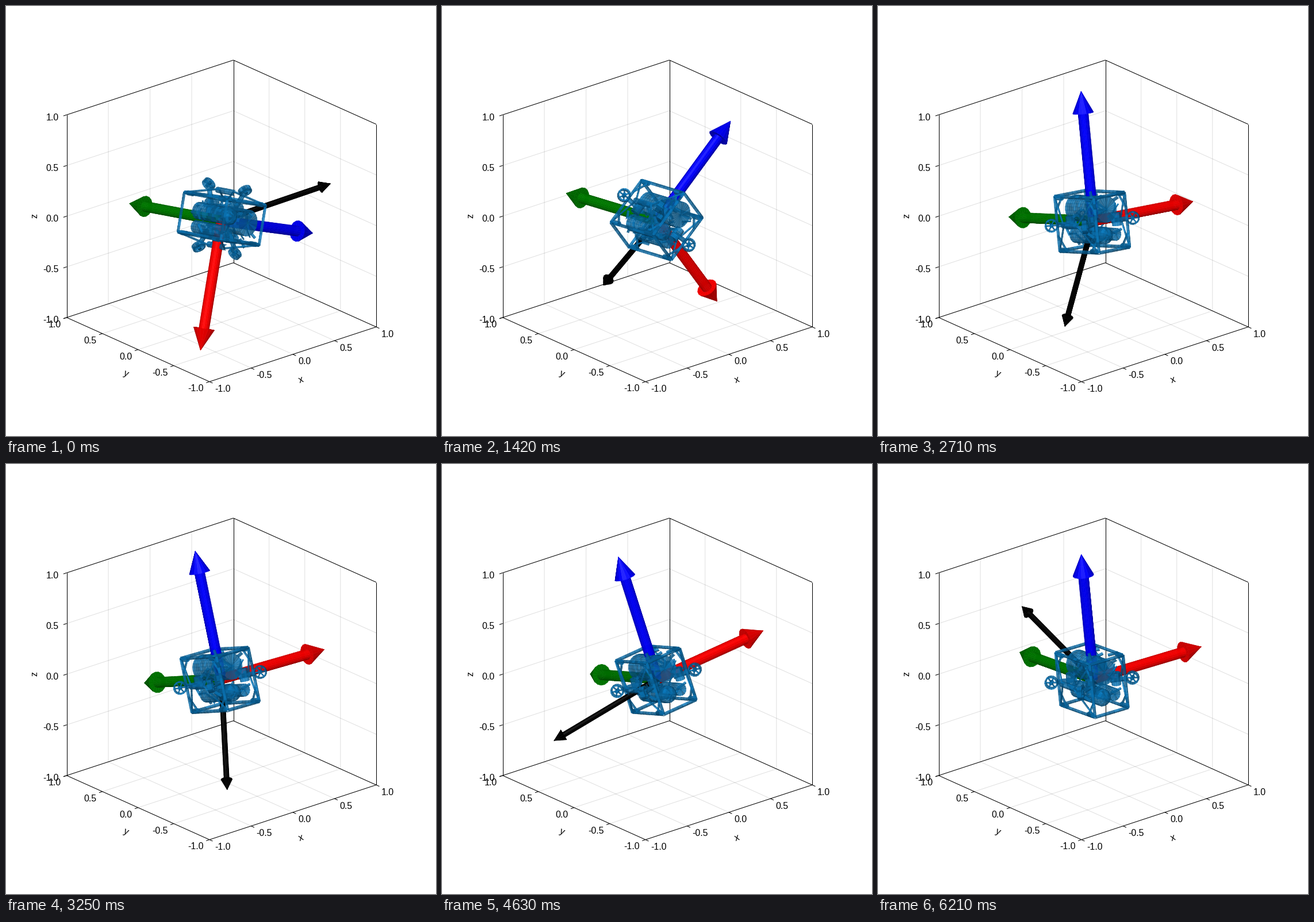
Write a matplotlib script that moves like this. It is 748 px wide and 748 px high and loops after 6250 ms.

```python
import itertools

import numpy as np
import matplotlib.pyplot as plt
from matplotlib.animation import FuncAnimation
from matplotlib.collections import LineCollection, PolyCollection

SIZE, FRAMES, LOOP = 748, 150, 6250
CENTER = np.array([374.75, 373.8])
AXES = np.array([[145, -47.6], [-124.2, -55.8], [0, -176.3]])  # px per data unit
LIGHT = np.array([-0.1, 0.3, 0.95])
LIGHT /= np.linalg.norm(LIGHT)
UP = np.array([0, 1, 0])
rng = np.random.default_rng(4)

# seconds; green azimuth, elevation, roll about green; black azimuth, elevation
KEYS = np.array([
    [0.000, -135, 7.6, -95.4, -18, 18],
    [0.625, -135, 13.0, -80.6, -268, -9],
    [2.167, -134, 7.1, -0.8, -660, -48],
    [3.250, -126, -1.8, 13.0, -997, -67],
    [4.083, -122, 4.3, 21.1, -1102, -46],
    [5.208, -121, 0.2, 19.6, -1483, -11],
    [6.208, -125, 11.7, 14.5, -1938, 37],
])
TIMES, ANGLES = KEYS[:, 0], np.radians(KEYS[:, 1:])
SLOPES = np.gradient(ANGLES, TIMES, axis=0)


def unit(v):
    return v / np.linalg.norm(v)


def angles_at(t):
    """Cubic Hermite through the key angles."""
    i = np.clip(np.searchsorted(TIMES, t, side="right") - 1, 0, len(TIMES) - 2)
    h = TIMES[i + 1] - TIMES[i]
    s = min((t - TIMES[i]) / h, 1)
    a = (1 + 2 * s) * (1 - s)**2
    return (a * ANGLES[i] + (1 - a) * ANGLES[i + 1]
            + h * s * (1 - s) * ((1 - s) * SLOPES[i] - s * SLOPES[i + 1]))


def direction(az, el):
    """Vector as (right, up, towards viewer)."""
    return np.array([np.cos(el) * np.cos(az), np.sin(el), np.cos(el) * np.sin(az)])


def attitude(az, el, roll):
    """Columns are the red, green and blue body axes."""
    green = direction(az, el)
    top = unit(UP - green * green[1])
    side = np.cross(green, top)
    red = np.sin(roll) * top + np.cos(roll) * side
    return np.column_stack([red, green, np.cross(red, green)])


def lathe(base, axis, prof, n=12):
    """Quads of a (distance, radius) profile turned about an axis."""
    w = unit(np.array(axis, float))
    u = unit(np.cross(w, np.eye(3)[np.argmin(abs(w))]))
    v = np.cross(w, u)
    th = np.linspace(0, 2 * np.pi, n + 1)
    ring = np.outer(np.cos(th), u) + np.outer(np.sin(th), v)
    d, r = np.array(prof, float).T[:, :, None, None]
    p = np.array(base, float) + d * w + r * ring
    quads = np.stack([p[:-1, :-1], p[:-1, 1:], p[1:, 1:], p[1:, :-1]], axis=2)
    return quads.reshape(-1, 4, 3)


def bar(p, q, r=2.8, n=4):
    p, q = np.array(p, float), np.array(q, float)
    length = np.linalg.norm(q - p)
    steps = np.linspace(0, length, max(2, int(length / 9) + 1))
    return lathe(p, q - p, [(s, r) for s in steps], n)


def can(base, axis, length, r, n=18, dome=0):
    prof = [(0, 0)]
    if dome:
        prof += [(dome * (1 - np.cos(a)), r * np.sin(a)) for a in (0.4, 0.8, 1.2)]
    prof += [(s, r) for s in np.linspace(dome, length, int(length / 5))]
    return lathe(base, axis, prof + [(length, 0)], n)


def arrow(axis, r, head_r, head, n=16, shaft=190, segs=20):
    prof = [(s, r) for s in np.linspace(0, shaft, segs + 1)]
    prof += [(shaft, head_r), (shaft + head / 2, head_r / 2), (shaft + head, 0)]
    bias = np.zeros((segs + 3) * n)
    bias[segs * n:(segs + 1) * n] = -12  # flat back of the head stays under the shaft
    return lathe((0, 0, 0), axis, prof, n), bias


def thruster(hub, axis):
    rim = [(-4, 9.5), (-4, 11.5), (4, 11.5), (4, 9.5), (-4, 9.5)]
    across = np.cross(axis, (0, 0, 1))
    parts = [lathe(hub, axis, rim, 16), can(hub - 6 * axis, axis, 12, 3, 8)]
    for a in np.arange(3) * np.pi / 3:
        spoke = 10 * (np.cos(a) * across + np.array([0, 0, np.sin(a)]))
        parts.append(bar(hub - spoke, hub + spoke, 1.2))
    return parts


def vehicle():
    mid, half = np.array([-4, -1, -1]), np.array([35, 53, 48])
    parts = []
    corners = [mid + half * s for s in itertools.product((-1, 1), repeat=3)]
    for p, q in itertools.combinations(corners, 2):
        if np.count_nonzero(p != q) == 1:
            parts.append(bar(p, q))
    for p in corners:
        x, y, z = np.sign(mid - p)
        parts.append(bar(p + (0, 0, 26 * z), p + (0, 20 * y, 0), 2))
        parts.append(can(p + (0, 6 * y, 2 * z), (0, y, 0), 14, 4, 8))
        parts.append(bar(p, mid + (-50 * x, -18 * y, 0), 1.6))

    parts.append(can((-4, -43, 22), (0, 1, 0), 84, 23, 24))
    parts.append(can((-11, -51, -23), (0, 1, 0), 88, 15, 18, dome=10))
    parts.append(can((17, -38, -25), (0, 1, 0), 74, 11, 14))

    for sx in (-1, 1):
        parts.append(bar(mid + (sx * 48, -22, 0), mid + (sx * 48, 22, 0), 5, 8))
        for sy in (-1, 1):
            hub = mid + (sx * 55, sy * 45, 0)
            parts += thruster(hub, unit(np.array([1, -sx * sy, 0.0])))
            parts.append(bar(hub + (-sx * 9, -sy * 4, 0), (sx * 18, sy * 26, -2), 4, 8))
            parts.append(can((sx * 27, sy * 30, -11), (0, 0, 1), 22, 8, 12))

    for _ in range(40):  # cables and brackets
        p = mid + half * rng.uniform(-.9, .9, 3)
        parts.append(bar(p, p + rng.uniform(-16, 16, 3), rng.uniform(1.2, 3)))
    return np.concatenate(parts)


def layer(mesh, bias, tint, alpha, gloss):
    """Mesh with one row of depth bias, alpha, gloss and colour per face."""
    look = np.empty((len(mesh), 6))
    look[:, 0], look[:, 1], look[:, 2], look[:, 3:] = bias, alpha, gloss, tint
    return mesh, look


body = vehicle()
paint = np.array([.04, .45, .70]) * rng.uniform(.78, 1.1, (len(body), 1))
layers = [layer(body, 0, paint, .82, 0)]
for axis, color in zip(np.eye(3), [(1, 0, 0), (0, .5, 0), (0, 0, 1)]):
    layers.append(layer(*arrow(axis, 8.9, 18.3, 38), color, 1, .17))
SOLID = np.concatenate([mesh for mesh, _ in layers])


def needle(axis):
    return arrow(axis, 4.6, 10, 19.5, n=12)


layers.append(layer(*needle(UP), (0, 0, 0), 1, .1))
LOOK = np.concatenate([look for _, look in layers])
BIAS, ALPHA, GLOSS, TINT = LOOK[:, 0], LOOK[:, 1:2], LOOK[:, 2:3], LOOK[:, 3:]

fig = plt.figure(figsize=(SIZE / 100, SIZE / 100), dpi=100, facecolor="white")
ax = fig.add_axes([0, 0, 1, 1])
ax.set_xlim(0, SIZE)
ax.set_ylim(SIZE, 0)
ax.axis("off")


def project(x, y, z):
    return CENTER + np.array([x, y, z]) @ AXES


def write(pos, text, ha="center", rot=0):
    ax.text(*pos, text, ha=ha, va="center", rotation=rot, fontsize=11.4,
            family="Liberation Sans", color="black")


def draw_box():
    grid, edges, marks = [], [], []
    for v in (-.5, 0, .5):
        for path in ([(v, -1, -1), (v, 1, -1), (v, 1, 1)],
                     [(-1, v, -1), (1, v, -1), (1, v, 1)],
                     [(-1, 1, v), (1, 1, v), (1, -1, v)]):
            grid.append([project(*p) for p in path])
    for p, q in itertools.combinations(itertools.product((-1, 1), repeat=3), 2):
        hidden = (-1, -1, 1)  # the corner facing the viewer has no edges
        if sum(a != b for a, b in zip(p, q)) == 1 and hidden not in (p, q):
            edges.append([project(*p), project(*q)])

    left, right = -6 * unit(AXES[0]), -6 * unit(AXES[1])
    for v in (-1, -.5, 0, .5, 1):
        for pos, out, shift, ha in (
                (project(v, -1, -1), right, (9, 13), "left"),
                (project(-1, v, -1), left, (-10, 12.5), "right"),
                (project(-1, 1, v), left, (-14, 5), "right")):
            marks.append([pos, pos + out])
            write(pos + np.array(shift), f"{v:.1f}", ha)
    for lines, color in ((grid, (0, 0, 0, .12)), (edges, "black"), (marks, "black")):
        ax.add_collection(LineCollection(lines, colors=[color], linewidths=.75, zorder=1))
    write((513, 650), "x", rot=18)
    write((209, 640), "y", rot=-24)
    write((50, 365), "z", rot=90)


draw_box()
scene = PolyCollection([], linewidths=.4, zorder=3)
ax.add_collection(scene)


def update(k):
    az, el, roll, field_az, field_el = angles_at(k * LOOP / FRAMES / 1000)
    solid = SOLID @ attitude(az, el, roll).T
    probe, _ = needle(direction(field_az, field_el))
    faces = np.concatenate([solid, probe])

    normal = np.cross(faces[:, 2] - faces[:, 0], faces[:, 3] - faces[:, 1])
    normal /= np.linalg.norm(normal, axis=1, keepdims=True) + 1e-9
    front = np.flatnonzero(normal[:, 2] > 0)
    depth = faces[front, :, 2].mean(axis=1) + BIAS[front]
    order = front[np.argsort(depth)]

    lit = np.clip(normal[order] @ LIGHT, 0, 1)[:, None]
    rgb = TINT[order] * (.56 + .44 * lit) + GLOSS[order] * lit**20
    rgba = np.hstack([np.clip(rgb, 0, 1), ALPHA[order]])
    scene.set_verts(CENTER + faces[order, :, :2] * (1, -1))
    scene.set_facecolor(rgba)
    scene.set_edgecolor(rgba)
    return scene,


anim = FuncAnimation(fig, update, frames=FRAMES, interval=LOOP / FRAMES,
                     repeat=True, repeat_delay=0)
plt.show()
```
